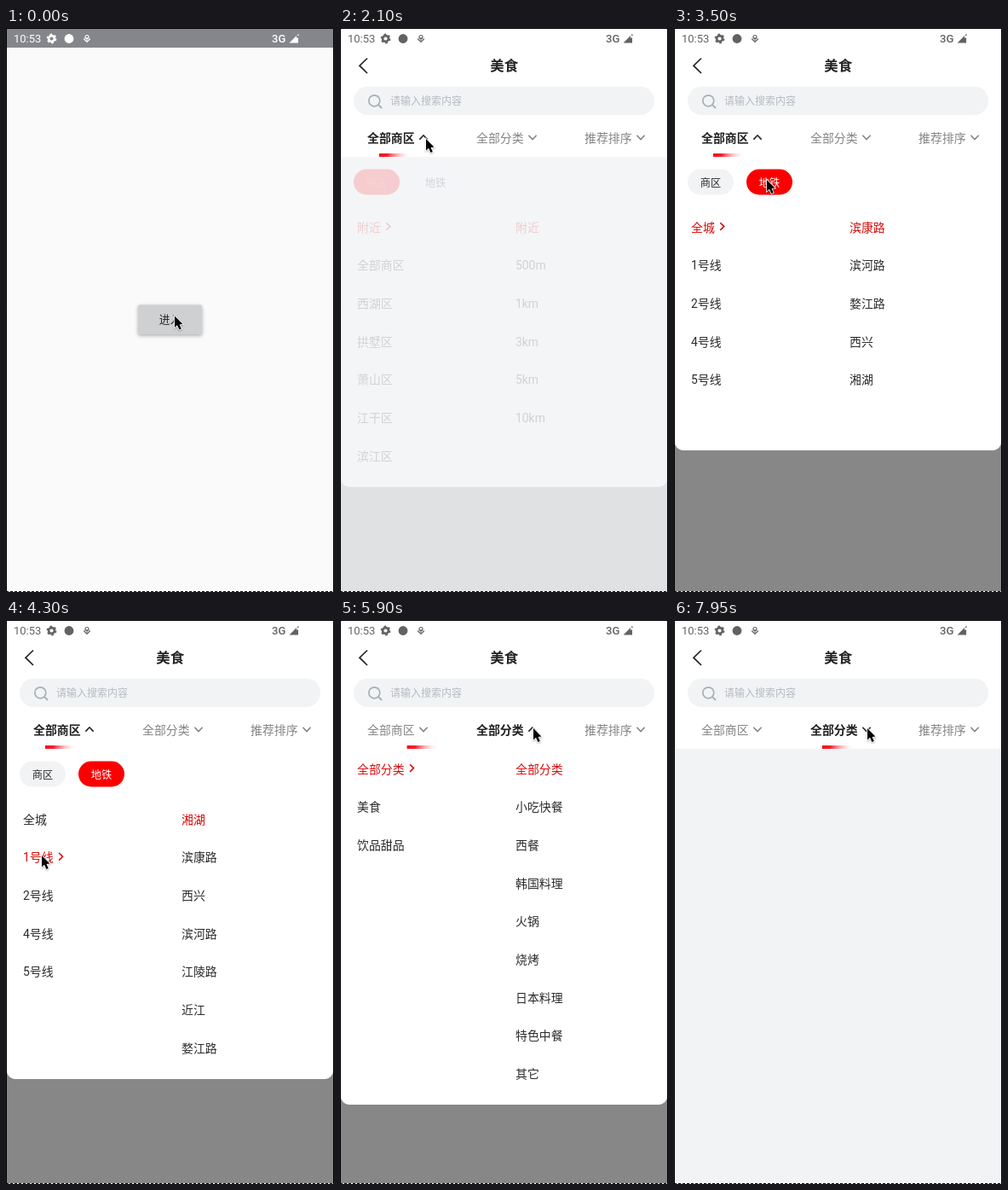
An HTML page with a canvas that plays this animation: 385x661 px, repeating every 8000 ms.

```html
<!DOCTYPE html>
<html lang="zh-CN">
<head>
<meta charset="utf-8">
<style>
html, body { margin: 0; width: 385px; height: 661px; overflow: hidden; background: #fff; }
canvas { display: block; }
</style>
</head>
<body>
<canvas id="stage" width="385" height="661"></canvas>
<script>
const LOOP = 8000;
const RED = '#d80a0a', INK = '#2b2b2b', GREY = '#858585';
const g = document.getElementById('stage').getContext('2d');

const tabs = [['全部商区', 32, 98], ['全部分类', 160, 226], ['推荐排序', 287, 353]];

const areas = {
  bottom: 538, top: 233, pill: 0, pick: 0,
  left: ['附近', '全部商区', '西湖区', '拱墅区', '萧山区', '江干区', '滨江区'],
  right: ['附近', '500m', '1km', '3km', '5km', '10km']
};
const lines = ['全城', '1号线', '2号线', '4号线', '5号线'];
const metro = {
  bottom: 495, top: 233, pill: 1, pick: 0, left: lines,
  right: ['滨康路', '滨河路', '婺江路', '西兴', '湘湖']
};
const lineOne = {
  bottom: 538, top: 233, pill: 1, pick: 1, left: lines,
  right: ['湘湖', '滨康路', '西兴', '滨河路', '江陵路', '近江', '婺江路']
};
const dishes = {
  bottom: 568, top: 174, pill: -1, pick: 0,
  left: ['全部分类', '美食', '饮品甜品'],
  right: ['全部分类', '小吃快餐', '西餐', '韩国料理', '火锅', '烧烤', '日本料理', '特色中餐', '其它']
};

// Pointer path: time, x, y
const path = [
  [0, 198, 337.5], [850, 198, 337.5], [1300, 99, 166], [1700, 101, 130],
  [2700, 101, 130], [3050, 109, 178], [3600, 109, 178], [4000, 42, 276],
  [4400, 42, 276], [4850, 192, 148], [4900, 192, 148], [5600, 224, 129],
  [5780, 227, 127], [LOOP, 227, 127]
];

const part = (t, a, b) => Math.min(1, Math.max(0, (t - a) / (b - a)));
const ease = p => 0.5 - 0.5 * Math.cos(Math.PI * p);
const mix = (a, b, p) => a + (b - a) * p;

function text(s, x, cy, size, color, weight = 400, align = 'left') {
  g.font = `${weight} ${size}px Roboto, "Noto Sans CJK SC", "Noto Sans CJK", sans-serif`;
  g.textAlign = align;
  g.fillStyle = color;
  g.fillText(s, x, cy + size * 0.37);
}

function box(x, y, w, h, color, r = 0) {
  g.fillStyle = color;
  g.beginPath();
  g.roundRect(x, y, w, h, r);
  g.fill();
}

function shape(points, close) {
  g.beginPath();
  for (let i = 0; i < points.length; i += 2) g.lineTo(points[i], points[i + 1]);
  if (close) g.closePath();
}

function stroke(points, color, width) {
  shape(points);
  g.strokeStyle = color;
  g.lineWidth = width;
  g.stroke();
}

function ring(x, y, r, width, color, dash = []) {
  g.beginPath();
  g.arc(x, y, r, 0, 7);
  g.strokeStyle = color;
  g.lineWidth = width;
  g.setLineDash(dash);
  g.stroke();
  g.setLineDash([]);
}

function dot(x, y, r, color) {
  g.fillStyle = color;
  g.beginPath();
  g.arc(x, y, r, 0, 7);
  g.fill();
}

function statusBar(color) {
  text('10:53', 9, 12.3, 13, color);
  ring(53.5, 12.5, 3.4, 2.6, color);
  ring(53.5, 12.5, 5, 1.8, color, [2.6, 2.636]);
  dot(74, 12.5, 5.4, color);
  ring(95, 10.5, 2, 1.2, color);
  stroke([91.2, 12.5, 95, 16.5, 98.8, 12.5], color, 1.2);
  stroke([95, 11, 95, 15], color, 1);
  text('3G', 312, 12.3, 13, color, 500);
  g.fillStyle = color;
  shape([332.5, 17.5, 341, 9, 341, 11.5, 343, 11.5, 343, 17.5], true);
  g.fill();
  box(342, 7.5, 1.6, 1.6, color);
}

function home() {
  box(0, 0, 385, 661, '#fafafa');
  box(0, 0, 385, 23, '#85868b');
  g.save();
  g.shadowColor = 'rgba(0,0,0,.32)';
  g.shadowBlur = 4;
  g.shadowOffsetY = 1.5;
  box(155, 324.5, 75, 34.5, '#cfd0d1', 2);
  g.restore();
  text('进入', 192.5, 341.8, 12.7, '#222', 400, 'center');
}

function panel(p) {
  const h = p.bottom - 151;
  g.fillStyle = '#878787';
  g.beginPath();
  g.rect(0, 151, 385, 510);
  g.roundRect(1, 151, 383, h, [0, 0, 10, 10]);
  g.fill('evenodd');
  box(1, 151, 383, h, '#fff', [0, 0, 10, 10]);
  if (p.pill >= 0) ['商区', '地铁'].forEach((s, i) => {
    const on = i === p.pill, x = 16 + 69 * i;
    box(x, 165.5, 54, 30, on ? '#fb0000' : '#f2f3f5', 15);
    text(s, x + 27, 181, 12.2, on ? '#fff' : INK, 400, 'center');
  });
  const column = (list, x, pick) => list.forEach((s, i) =>
    text(s, x, p.top + 0.4 + i * 44.7, 13.9, i === pick ? RED : INK));
  column(p.right, 206, 0);
  column(p.left, 20, p.pick);
  const x = 20 + g.measureText(p.left[p.pick]).width + 6.5;
  const y = p.top - 0.4 + p.pick * 44.7;
  stroke([x, y - 4.3, x + 4.4, y, x, y + 4.3], RED, 1.6);
}

function page(t) {
  const active = t < 5800 ? 0 : 1;
  const open = t >= 1950 && t < 7080;
  box(0, 0, 385, 661, '#f2f3f5');
  box(0, 0, 385, 151, '#fff');
  stroke([32, 35.5, 23, 44.2, 32, 53], '#222', 1.7);
  text('美食', 192.7, 44.3, 16.4, '#222', 700, 'center');
  box(16, 68.5, 353, 33.5, '#f1f3f5', 17);
  ring(40.3, 85.3, 6.5, 1.7, '#a9afb8');
  stroke([45, 90, 49, 94], '#a9afb8', 1.8);
  text('请输入搜索内容', 59, 85.4, 12, '#b6bac1');

  tabs.forEach(([s, x, cx], i) => {
    const on = i === active, color = on ? '#222' : GREY;
    const d = on && open ? -2.4 : 2.4;
    text(s, x, 129.3, 13.9, color, on ? 700 : 400);
    stroke([cx - 4.6, 128.2 - d, cx, 128.2 + d, cx + 4.6, 128.2 - d], color, 1.6);
  });

  const alpha = ease(part(t, 1990, 2400)) * (1 - ease(part(t, 7100, 7380)));
  if (alpha > 0) {
    g.save();
    g.globalAlpha = alpha;
    panel(t < 3200 ? areas : t < 4100 ? metro : t < 5800 ? lineOne : dishes);
    g.restore();
  }

  const x = mix(46, 174, ease(part(t, 5800, 6100)));
  const fade = g.createLinearGradient(x, 0, x + 38, 0);
  fade.addColorStop(0, '#f2101c');
  fade.addColorStop(0.25, '#f2202c');
  fade.addColorStop(1, 'rgba(255,255,255,0)');
  box(x, 147, 38, 4, fade);
}

function pointer(t) {
  const i = path.findIndex(k => k[0] > t);
  const [t0, x0, y0] = path[i - 1], [t1, x1, y1] = path[i];
  const p = ease(part(t, t0, t1));
  g.save();
  g.translate(mix(x0, x1, p), mix(y0, y1, p));
  g.shadowColor = 'rgba(0,0,0,.3)';
  g.shadowBlur = 2;
  g.shadowOffsetY = 1;
  shape([0, 0, 0, 13.4, 3, 10.8, 5.4, 16, 7.8, 15, 5.5, 9.9, 9.4, 9.6], true);
  g.strokeStyle = '#fff';
  g.lineWidth = 1.6;
  g.stroke();
  g.shadowColor = 'transparent';
  g.fillStyle = '#000';
  g.fill();
  g.restore();
}

function frame() {
  box(1, 1, 383, 659, '#000');
  box(0, 660, 385, 1, '#fff');
  stroke([0, 0.5, 384.5, 0.5, 384.5, 661], '#000', 1);
  stroke([0.5, 0, 0.5, 661], '#000', 1);
  g.setLineDash([3, 2]);
  stroke([0, 660.5, 385, 660.5], '#000', 1);
  g.setLineDash([]);
}

function draw(now) {
  const t = now % LOOP;
  frame();
  g.save();
  g.beginPath();
  g.rect(1, 1, 383, 659);
  g.clip();
  if (t < 800) home();
  if (t >= 500) {
    g.save();
    g.translate(385 * (1 - part(t, 500, 800)) ** 4.8, 0);
    page(t);
    g.restore();
  }
  const shade = Math.round(mix(255, 98, t < 700 ? part(t, 550, 700) * 0.22 : mix(0.22, 1, part(t, 700, 900))));
  statusBar(`rgb(${shade},${shade},${shade})`);
  pointer(t);
  g.restore();
  requestAnimationFrame(() => draw(performance.now()));
}
draw(performance.now());
</script>
</body>
</html>
```
